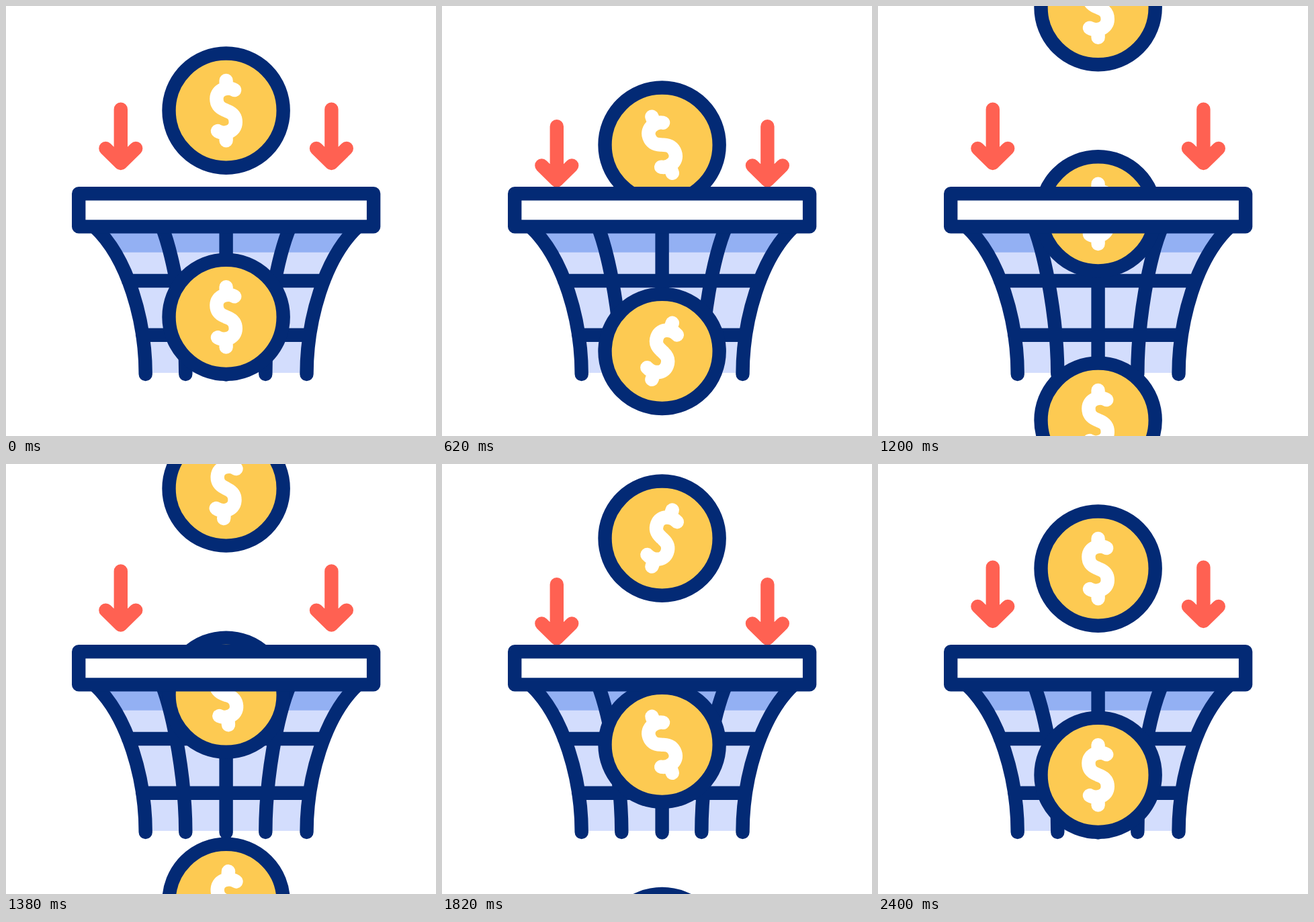
An HTML page for the animation above (2.42 s loop, 640 by 640 pixels).

```html
<!DOCTYPE html>
<html lang="en">
<head>
<meta charset="utf-8">
<title>Coins through a hoop</title>
<style>
  html, body { margin: 0; height: 100%; overflow: hidden; background: #fff; }
  svg { display: block; width: 100%; height: 100%; }
  .line { fill: none; stroke: #032a75; stroke-width: 20.4; stroke-linecap: round; stroke-linejoin: round; }
  .red { stroke: #ff6152; }
  .white { stroke: #fff; }
</style>
</head>
<body>
<svg viewBox="0 0 640 640">
  <defs>
    <clipPath id="net">
      <path d="M131 328C182 375 207.7 470 207.7 546H447.5C447.5 470 473.2 375 524.2 328Z"/>
    </clipPath>
    <path id="arrow" class="line red" d="M0 153.8V234M-22.4 212L0 234L22.4 212"/>
    <circle id="disc" class="line" r="85.1" style="fill:#fdca52"/>
    <path id="dollar" class="line white" d="M0-44.7V-33M0 44.7V33M12.6-30.5C3-36-14.2-32-14.2-17.5C-14.2-4-4-2 0 0S14.2 4 14.2 17.5C14.2 32-3 36-12.6 30.5"/>
  </defs>

  <g clip-path="url(#net)">
    <rect y="328" width="640" height="218" fill="#d3ddfd"/>
    <rect y="328" width="640" height="38.7" fill="#93b0f3"/>
  </g>
  <path class="line" d="M131 328C182 375 207.7 470 207.7 548M232 328C250 375 267.3 470 267.3 548
    M327.6 328V548.5M423 328C403 375 386.3 470 386.3 548M524.2 328C473.2 375 447.5 470 447.5 548
    M182 409H473M203 489.7H452"/>

  <g id="arrows">
    <use href="#arrow" x="170.8"/>
    <use href="#arrow" x="484.4"/>
  </g>
  <g class="coin"><use href="#disc"/><use href="#dollar"/></g>
  <g class="coin"><use href="#disc"/><use href="#dollar"/></g>
  <g class="coin"><use href="#disc"/><use href="#dollar"/></g>
  <rect class="line" x="108.2" y="279.2" width="438.9" height="49.2" style="fill:#fff"/>
</svg>
<script>
  const LOOP = 2420, FALL = 2400, GAP = 307.2;
  const arrows = document.getElementById('arrows');
  const coins = document.querySelectorAll('.coin');
  const ease = u => u * u * (3 - 2 * u);

  function draw(now) {
    const t = Math.min(now % LOOP, FALL);
    const fall = ease(t / FALL);
    // rises and returns twice per fall
    const swing = ease(1 - Math.abs(t % 1200 / 600 - 1));

    arrows.setAttribute('transform', `translate(0 ${25.6 * swing})`);
    coins.forEach((coin, i) => {
      const y = 155.6 + GAP * (fall + i - 1);
      const tilt = (i === 1 ? -20 : 20) * swing;
      coin.setAttribute('transform', `translate(327.6 ${y})`);
      coin.lastChild.setAttribute('transform', `rotate(${tilt})`);
    });
  }

  const start = performance.now();
  function tick() {
    draw(performance.now() - start);
    requestAnimationFrame(tick);
  }
  tick();
</script>
</body>
</html>
```
